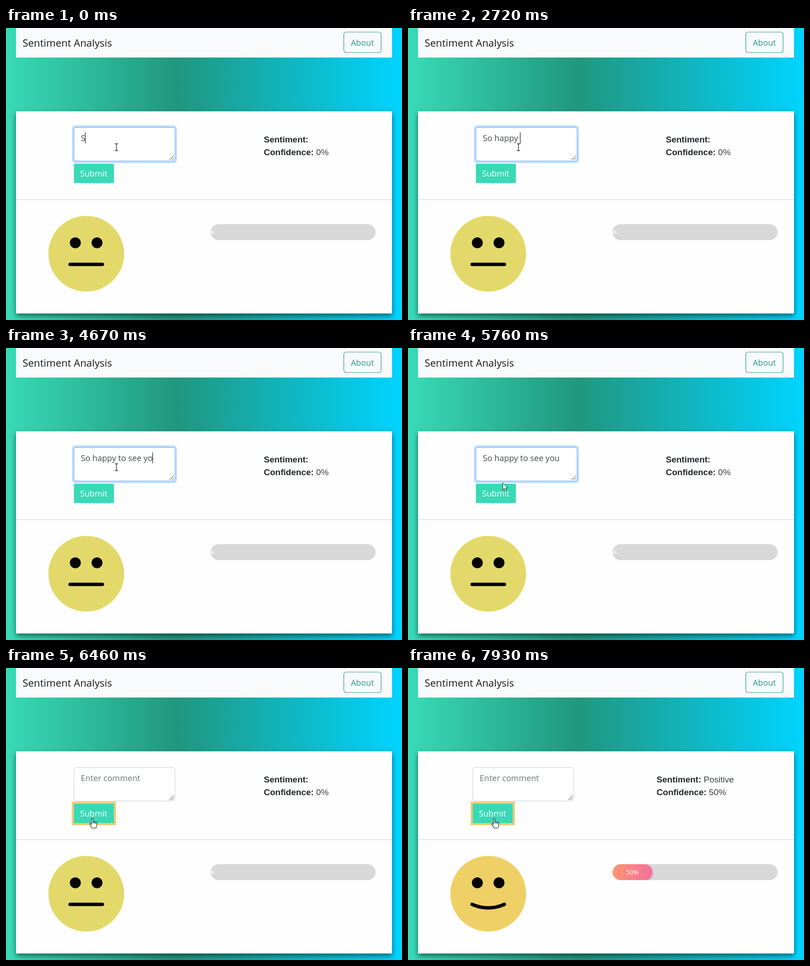
Recreate the animation shown at these times as an HTML page. Size 871x643 px, loop 8 s.

```html
<!DOCTYPE html>
<html lang="en">
<head>
<meta charset="utf-8">
<title>Sentiment Analysis</title>
<style>
  html, body { margin: 0; width: 100%; height: 100%; overflow: hidden; }
  svg { display: block; width: 871px; height: 643px; }
  text { font: 18.1px "Open Sans", "Noto Sans", sans-serif; white-space: pre; }
  .result { font: 19px "Liberation Sans", Arial, sans-serif; fill: #3c4045; }
  .result tspan { font-weight: bold; fill: #212529; }
</style>
</head>
<body>
<svg viewBox="0 0 871 643">
  <defs>
    <linearGradient id="sky">
      <stop offset="0" stop-color="#38dab7"/>
      <stop offset=".43" stop-color="#21977f"/>
      <stop offset="1" stop-color="#00d4ff"/>
    </linearGradient>
    <linearGradient id="warm">
      <stop offset="0" stop-color="#ff9472"/>
      <stop offset="1" stop-color="#f2709c"/>
    </linearGradient>
    <filter id="cardShadow" x="-5%" y="-10%" width="110%" height="120%">
      <feDropShadow dx="0" dy="5" stdDeviation="6" flood-opacity=".55"/>
    </filter>
    <filter id="barShadow" filterUnits="userSpaceOnUse" x="420" y="410" width="420" height="80">
      <feDropShadow dx="0" dy="2" stdDeviation="2.6" flood-color="#f2709c"/>
    </filter>
    <clipPath id="track"><rect x="450" y="432" width="363" height="35" rx="17.5"/></clipPath>
  </defs>

  <rect width="871" height="643" fill="url(#sky)"/>
  <rect x="22" width="827" height="65" fill="#f8fafc"/>
  <text x="36.5" y="41" style="font-size:22.3px" fill="#16191c">Sentiment Analysis</text>
  <rect x="743" y="9" width="82" height="45" rx="5" fill="none" stroke="#2b9a82" stroke-width="1.2"/>
  <text x="784" y="39" text-anchor="middle" fill="#2b9a82">About</text>

  <rect x="22" y="183.5" width="827" height="445" fill="#fefefe" filter="url(#cardShadow)"/>
  <path d="M22 378H849" stroke="#dedede" stroke-width="1.5"/>

  <g id="form">
    <rect id="fieldRing" x="145" y="214.5" width="231" height="83" rx="8" fill="#bfdbff"/>
    <rect id="field" x="149.6" y="219.2" width="222" height="73.6" rx="4.7" fill="#fff" stroke-width="1.2"/>
    <path d="M359.5 290.5 369 281M364.5 290.5 369 286" stroke="#777" stroke-width="1.1"/>
    <text id="entry" x="164.5" y="249"></text>
    <path id="caret" d="M0 230V254" stroke="#111" stroke-width="1.2"/>
    <rect id="buttonRing" x="144.7" y="294.2" width="97.5" height="52" fill="#efcb79"/>
    <rect x="149.3" y="299" width="88" height="42.5" fill="#38d9b6"/>
    <text x="193" y="327" text-anchor="middle" fill="#fff">Submit</text>
  </g>

  <g id="results">
    <text class="result" x="567" y="252"><tspan>Sentiment:</tspan> <tspan id="mood" style="font-weight:normal;fill:inherit"></tspan></text>
    <text class="result" x="567" y="280.3"><tspan>Confidence:</tspan> <tspan id="score" style="font-weight:normal;fill:inherit"></tspan></text>
  </g>

  <circle id="face" cx="176.5" cy="497" r="83.3"/>
  <circle cx="152.5" cy="473" r="12"/>
  <circle cx="200.2" cy="473" r="12"/>
  <path id="mouth" fill="none" stroke="#000" stroke-width="7.5" stroke-linecap="round"/>

  <g clip-path="url(#track)">
    <rect x="450" y="432" width="363" height="35" fill="#d8d8d8"/>
    <rect id="bar" x="450" y="432" height="35" rx="17.5" fill="url(#warm)" filter="url(#barShadow)"/>
  </g>
  <text id="barLabel" y="455.3" text-anchor="middle" style="font-size:13.8px" fill="#fff"></text>

  <g id="beam" fill="none">
    <path d="M-3.5-7.5H-1Q0-7.5 0-6.5V6.5Q0 7.5-1 7.5H-3.5M3.5-7.5H1Q0-7.5 0-6.5M3.5 7.5H1Q0 7.5 0 6.5" stroke="#222" stroke-width="1.3"/>
  </g>
  <path id="arrow" d="M0 0V15.5L3.6 12.2 6 17.8 8.6 16.7 6.2 11.2H11Z" fill="#fff" stroke="#111"/>
  <g id="hand" stroke="#111" stroke-width="1.1" stroke-linejoin="round">
    <path d="M-1 2a1.6 1.6 0 0 1 3.2 0v6.5c0-1.6 3-1.6 3 .4c.2-1.4 2.8-1.2 2.8.6c.3-1.2 2.6-.9 2.6 1v4.5q0 3-2 6.5H.2q-1-3-4.3-6.8c-2-2.4.4-4.2 2-2.4l1.1 1.4Z" fill="#fff"/>
    <path d="M2.2 8.5v3M5.2 9v2.8M8 9.7v2.3" fill="none"/>
  </g>
</svg>
<script>
const LOOP = 8000;
const MESSAGE = "So happy to see you";
const KEY_TIMES = [0, 230, 460, 1470, 1620, 2020, 2170, 2490, 2720, 3100,
  3270, 3420, 3570, 3890, 4120, 4290, 4520, 4670, 4980];
const POINTER = [
  { at: 0, kind: "beam", x: 243, y: 262.5 },
  { at: 5680, kind: "beam", x: 228, y: 277 },
  { at: 5760, kind: "arrow", x: 208.5, y: 297 },
  { at: 5830, kind: "hand", x: 198, y: 313 },
  { at: 5910, kind: "hand", x: 192, y: 325 },
  { at: 5980, kind: "hand", x: 190, y: 330 },
  { at: 6060, kind: "hand", x: 189, y: 331 }
];
const BLUR_STEPS = [{ at: 0, value: 0 }, { at: 6310, value: .3 }, { at: 6390, value: .85 }, { at: 6460, value: 1 }];
const GROW_STEPS = [0, 7700, 7780, 7850, 7930].map(at => ({ at }));
const CLEARED = 6390, ANSWERED = 7470, GROW_START = 7646, GROW_TIME = 1000;

const el = {};
document.querySelectorAll("svg [id]").forEach(node => el[node.id] = node);
const set = (node, attrs) => {
  for (const name in attrs) node.setAttribute(name, attrs[name]);
};
const show = (node, visible) => node.style.display = visible ? "" : "none";
const latest = (steps, t) => steps.filter(step => step.at <= t).pop();
const mix = (a, b, k) => `rgb(${a.map((v, i) => Math.round(v + (b[i] - v) * k))})`;

const pen = document.createElement("canvas").getContext("2d");
function textWidth(text) {
  pen.font = '18.1px "Open Sans", "Noto Sans", sans-serif';
  return pen.measureText(text).width;
}

// CSS "ease": cubic-bezier(.25, .1, .25, 1)
function ease(x) {
  if (x <= 0) return 0;
  if (x >= 1) return 1;
  const curve = (a, b, u) => 3 * a * u * (1 - u) ** 2 + 3 * b * u * u * (1 - u) + u ** 3;
  let low = 0, high = 1;
  for (let i = 0; i < 24; i++) {
    const mid = (low + high) / 2;
    if (curve(.25, .25, mid) < x) low = mid; else high = mid;
  }
  return curve(.1, 1, low);
}

function drawForm(t) {
  const keys = KEY_TIMES.filter(at => at <= t);
  const typed = MESSAGE.slice(0, keys.length);
  const age = t - keys[keys.length - 1];
  const blur = latest(BLUR_STEPS, t).value;
  const cleared = t >= CLEARED;

  el.entry.textContent = cleared ? "Enter comment" : typed;
  set(el.entry, { fill: cleared ? "#6c757d" : "#43494f" });
  set(el.caret, { transform: `translate(${164.5 + textWidth(typed)})` });
  show(el.caret, blur === 0 && age % 1080 < 550);
  set(el.fieldRing, { opacity: 1 - blur });
  set(el.field, { stroke: mix([128, 189, 255], [206, 212, 218], blur) });
  set(el.buttonRing, { opacity: blur });
}

function drawResult(t) {
  const answered = t >= ANSWERED;
  const score = answered ? "50%" : "0%";
  set(el.form, { transform: `translate(${answered ? -7 : 0})` });
  set(el.results, { transform: `translate(${answered ? -20.2 : 0})` });
  el.mood.textContent = answered ? "Positive" : "";
  el.score.textContent = el.barLabel.textContent = score;

  const grown = ease((latest(GROW_STEPS, t).at - GROW_START) / GROW_TIME);
  const width = 181.5 * grown;
  const smile = Math.min(1, grown / .48);
  set(el.bar, { width });
  show(el.bar, width > 0);
  set(el.barLabel, { x: 450 + width / 2 });
  set(el.face, { fill: mix([227, 217, 107], [239, 208, 102], smile) });
  set(el.mouth, { d: `M141 520.5Q176.5 ${520.5 + 15.6 * smile} 212 520.5` });
}

function drawPointer(t) {
  const { kind, x, y } = latest(POINTER, t);
  for (const name of ["beam", "arrow", "hand"]) show(el[name], name === kind);
  set(el[kind], { transform: `translate(${x} ${y})` });
}

function render(t) {
  drawForm(t);
  drawResult(t);
  drawPointer(t);
}

const start = performance.now();
function tick() {
  render((performance.now() - start) % LOOP);
  requestAnimationFrame(tick);
}
tick();
</script>
</body>
</html>
```
